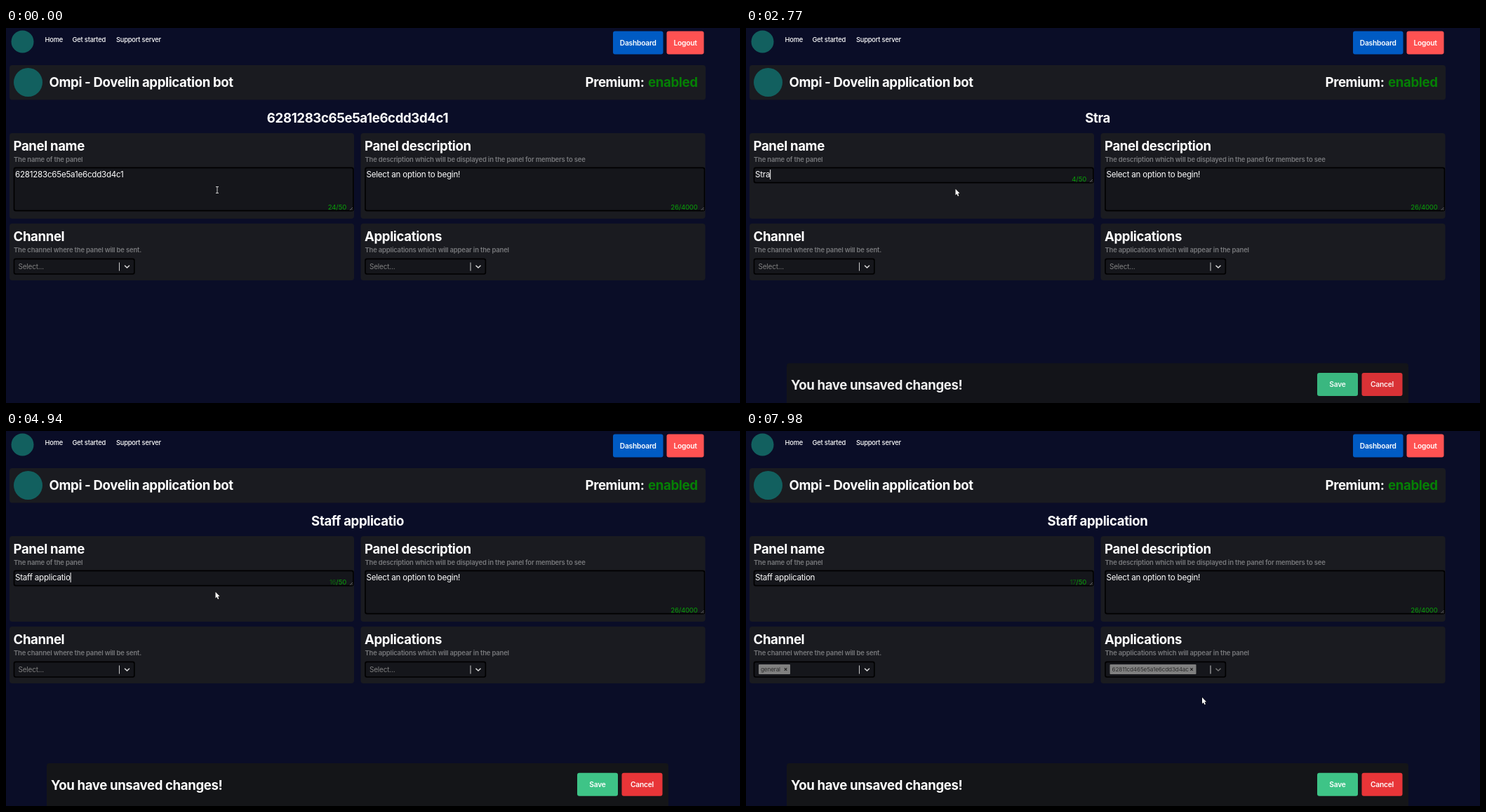
Write an HTML page with a canvas that moves like this. It is 1046x535 px and loops after 8 s.

```html
<!DOCTYPE html>
<html lang="en">
<head>
<meta charset="utf-8">
<title>Panel editor</title>
<style>
html, body { margin: 0; width: 100%; height: 100%; overflow: hidden; background: #0a0d27; }
canvas { display: block; width: 1046px; height: 535px; }
</style>
</head>
<body>
<canvas id="stage"></canvas>
<script>
const W = 1046, H = 535, LOOP = 8000;
const canvas = document.getElementById('stage');
const ctx = canvas.getContext('2d');
const dpr = window.devicePixelRatio || 1;
canvas.width = W * dpr;
canvas.height = H * dpr;

const BG = '#0a0d27', CARD = '#1a1b20', FIELD = '#15161b', WHITE = '#fff';
const GREEN = '#08a008', DIM_GREEN = '#0a620c', GREY = '#77787b';
const OLD_NAME = '6281283c65e5a1e6cdd3d4c1';
const APP_ID = '62811cd465e5a1e6cdd3d4ac';
const CHANNELS = ['general', 'bot-commands', 'welcome', 'rules', 'moderator-only',
  'changelog', 'announcements', 'leaves'];

// [time, text of the name field]
const TYPING = [
  [0, OLD_NAME], [2110, ''], [2310, 'S'], [2520, 'St'], [2630, 'Str'], [2740, 'Stra'],
  [3100, 'Str'], [3230, 'St'], [3330, 'Sta'], [3540, 'Staf'], [3680, 'Staff'],
  [3760, 'Staff '], [3870, 'Staff a'], [3940, 'Staff ap'], [4040, 'Staff app'],
  [4140, 'Staff appl'], [4310, 'Staff appli'], [4340, 'Staff applic'],
  [4540, 'Staff applica'], [4740, 'Staff applicat'], [4770, 'Staff applicati'],
  [4940, 'Staff applicatio'], [4970, 'Staff application']
];

// [time, x, y] of the pointer
const PATH = [
  [0, 301, 231], [90, 301, 231], [150, 298.5, 229.5], [5500, 298.5, 229.5], [5590, 304, 229],
  [5960, 91, 343], [6070, 91, 343], [6280, 70, 362], [6370, 69, 363], [6510, 69, 363],
  [7040, 622, 342], [7330, 622, 342], [7560, 612, 369], [7760, 612, 369], [7980, 650, 380]
];
const CLICKS = [[750, 910], [6000, 6170], [6340, 6510], [7080, 7240], [7600, 7760]];

const within = (t, a, b) => t >= a && t < b;

// CSS "ease" curve
function ease(x) {
  if (x <= 0) return 0;
  if (x >= 1) return 1;
  let lo = 0, hi = 1;
  for (let i = 0; i < 24; i++) {
    const s = (lo + hi) / 2;
    const bx = 0.75 * s * (1 - s) + s * s * s;
    if (bx < x) lo = s; else hi = s;
  }
  return 0.3 * lo * (1 - lo) ** 2 + 3 * lo * lo * (1 - lo) + lo ** 3;
}

function pointerAt(t) {
  const i = PATH.findIndex(p => p[0] > t);
  if (i < 0) return PATH[PATH.length - 1].slice(1);
  const [t0, x0, y0] = PATH[i - 1], [t1, x1, y1] = PATH[i];
  const k = (t - t0) / (t1 - t0), s = k * k * (3 - 2 * k);
  return [x0 + (x1 - x0) * s, y0 + (y1 - y0) * s];
}

function nameAt(t) {
  let name = '';
  for (const [start, value] of TYPING) if (t >= start) name = value;
  return name;
}

function box(x, y, w, h, color, r = 0) {
  ctx.fillStyle = color;
  ctx.beginPath();
  ctx.roundRect(x, y, w, h, r);
  ctx.fill();
}

function framed(x, y, w, h) {
  box(x, y, w, h, '#000', 3);
  box(x + 1.6, y + 1.6, w - 3.2, h - 3.2, FIELD, 2);
}

function disc(x, y, r, color) {
  ctx.fillStyle = color;
  ctx.beginPath();
  ctx.arc(x, y, r, 0, 7);
  ctx.fill();
}

function line(color, width, ...pts) {
  ctx.strokeStyle = color;
  ctx.lineWidth = width;
  ctx.beginPath();
  for (let i = 0; i < pts.length; i += 2) ctx.lineTo(pts[i], pts[i + 1]);
  ctx.stroke();
}

function font(size, weight = 400) {
  ctx.font = `${weight} ${size}px Inter, "Open Sans", sans-serif`;
  ctx.letterSpacing = `${size * -0.02}px`;
}

function text(str, x, y, size, weight = 400, color = WHITE, align = 'left') {
  font(size, weight);
  ctx.textAlign = align;
  ctx.fillStyle = color;
  ctx.fillText(str, x, y);
}

const title = (str, x, y, align, color) => text(str, x, y, 18.6, 700, color, align);

function card(x, y, h, head, note) {
  box(x, y, 491, h, CARD, 4);
  text(head, x + 5.5, y + 25, 18.6, 700);
  text(note, x + 6, y + 40.5, 9.5, 600, GREY);
}

function button(x, y, w, label, color) {
  box(x, y, w, 33, color, 3);
  text(label, x + w / 2, y + 20.3, 10.2, 600, WHITE, 'center');
}

function field(x, h) {
  framed(x - 0.3, 198.6, 485, h - 0.2);
  const b = 197 + h;
  line('#8a8a8a', 0.7, x + 479, b, x + 483, b - 4);
  line('#8a8a8a', 0.7, x + 481.5, b, x + 483, b - 1.5);
}

function counter(count, limit, right, y, color) {
  const tail = '/' + limit;
  text(tail, right, y, 9.6, 400, GREEN, 'right');
  const w = ctx.measureText(tail).width;
  text(count, right - w, y, 9.6, 400, color, 'right');
}

function tag(x, w, label) {
  box(x, 333, w, 14, '#808080', 1);
  text(label, x + 3, 343.3, 8.2, 400, '#2b2b2b');
  const cx = x + w - 6.5;
  line('#222', 1.1, cx - 1.8, 338.2, cx + 1.8, 341.8);
  line('#222', 1.1, cx - 1.8, 341.8, cx + 1.8, 338.2);
}

function select(x, focused, value, tagWidth) {
  framed(x - 0.3, 328.6, 173, 23.2);
  if (value) tag(x + 7, tagWidth, value);
  else text('Select...', x + 6.5, 344, 10, 400, '#808080');
  box(x + 150, 334.5, 1, 12, '#ccc');
  line(focused ? '#777' : '#ddd', 1.5, x + 158, 338.8, x + 161.5, 342, x + 165, 338.8);
}

function menu(x, h, options, activeWidth) {
  box(x, 357, 144.5, h, FIELD, 2);
  box(x, 359, activeWidth, 21.5, '#1e90ff');
  options.forEach((label, i) => text(label, x + 7, 373.3 + i * 21.9, 9.5));
}

function scrollbar(x, y, h) {
  box(x, y, 10, h, '#f1f1f1');
  box(x + 1, y + 9, 8, 35, '#c1c1c1');
  ctx.fillStyle = '#777';
  ctx.beginPath();
  ctx.moveTo(x + 3, y + 6);
  ctx.lineTo(x + 5, y + 3.5);
  ctx.lineTo(x + 7, y + 6);
  ctx.fill();
}

function header() {
  disc(23.5, 19.5, 16, '#12605f');
  text('Home', 55.5, 20.3, 9.3, 500);
  text('Get started', 94.5, 20.3, 9.3, 500);
  text('Support server', 157, 20.3, 9.3, 500);
  button(865, 4.5, 71.5, 'Dashboard', '#005bc4');
  button(941.5, 4.5, 53, 'Logout', '#ff5252');
  box(5, 53, 992, 49.5, CARD, 4);
  disc(31.5, 77.5, 20.5, '#12605f');
  title('Ompi - Dovelin application bot', 61.5, 84);
  title('enabled', 985.5, 84, 'right', '#058005');
  title('Premium:', 909.5, 84, 'right');
}

function form(t) {
  const name = nameAt(t), edited = t >= 2110;
  title(name, 501, 134.5, 'center');

  card(5, 150, 122, 'Panel name', 'The name of the panel');
  card(505.5, 150, 122, 'Panel description',
    'The description which will be displayed in the panel for members to see');
  card(5, 279, 81, 'Channel', 'The channel where the panel will be sent.');
  card(505.5, 279, 81, 'Applications', 'The applications which will appear in the panel');

  field(11, edited ? 23 : 63);
  font(11.6);
  const width = ctx.measureText(name).width;
  if (within(t, 1710, 2110)) box(13, 201, width, 16, '#0a60cf');
  text(name, 13, 213, 11.6);
  if (within(t, 750, 1270) || within(t, 2110, 5500)) box(13 + width, 202, 1, 14, WHITE);
  counter(name.length, 50, 485, edited ? 218.5 : 258.5,
    edited && name.length > 6 ? DIM_GREEN : GREEN);

  field(511.5, 63);
  text('Select an option to begin!', 513.5, 213, 11.6);
  counter(26, 4000, 985.5, 258.5, GREEN);

  select(11, within(t, 6000, 7080), t >= 6510 && 'general', 45);
  select(511.5, t >= 7080, t >= 7760 && APP_ID, 123);
  if (within(t, 6000, 6510)) {
    menu(11, 172, CHANNELS, 134);
    scrollbar(145, 357, 172);
  }
  if (within(t, 7080, 7760)) menu(511.5, 26, [APP_ID], 144.5);
}

function saveBar(t) {
  if (t < 2310) return;
  const p = ease((t - 2090) / 1000);
  ctx.save();
  ctx.globalAlpha = p;
  ctx.translate(0, 61 * (1 - p));
  box(58, 474, 886, 61, '#141518', [4, 4, 0, 0]);
  title('You have unsaved changes!', 64, 511.5);
  button(814, 487.8, 58, 'Save', '#3ec487');
  button(877.5, 487.8, 58, 'Cancel', '#e83538');
  ctx.restore();
}

function pointer(t) {
  const [x, y] = pointerAt(t);
  if (CLICKS.some(c => within(t, ...c))) disc(x - 0.5, y - 0.5, 7, 'rgba(190,176,20,.85)');
  if (t < 2110) {
    line('#ccc', 1, x, y - 4.5, x, y + 4.5);
    line('#ccc', 1, x - 2, y - 4.5, x + 2, y - 4.5);
    line('#ccc', 1, x - 2, y + 4.5, x + 2, y + 4.5);
    return;
  }
  const shape = [0, 0, 0, 9, 2, 7.2, 3.4, 10.4, 4.9, 9.7, 3.5, 6.6, 6.2, 6.4];
  ctx.beginPath();
  for (let i = 0; i < shape.length; i += 2) ctx.lineTo(x + shape[i], y + shape[i + 1]);
  ctx.closePath();
  ctx.lineWidth = 1;
  ctx.strokeStyle = '#000';
  ctx.stroke();
  ctx.fillStyle = WHITE;
  ctx.fill();
}

function draw(now) {
  const t = now % LOOP;
  ctx.setTransform(dpr, 0, 0, dpr, 0, 0);
  box(0, 0, W, H, BG);
  header();
  // the empty heading collapses and pulls the form up
  ctx.save();
  if (within(t, 2110, 2310)) ctx.translate(0, -26);
  form(t);
  ctx.restore();
  saveBar(t);
  pointer(t);
}

const start = performance.now();
function tick() {
  draw(performance.now() - start);
  requestAnimationFrame(tick);
}
tick();
</script>
</body>
</html>
```
